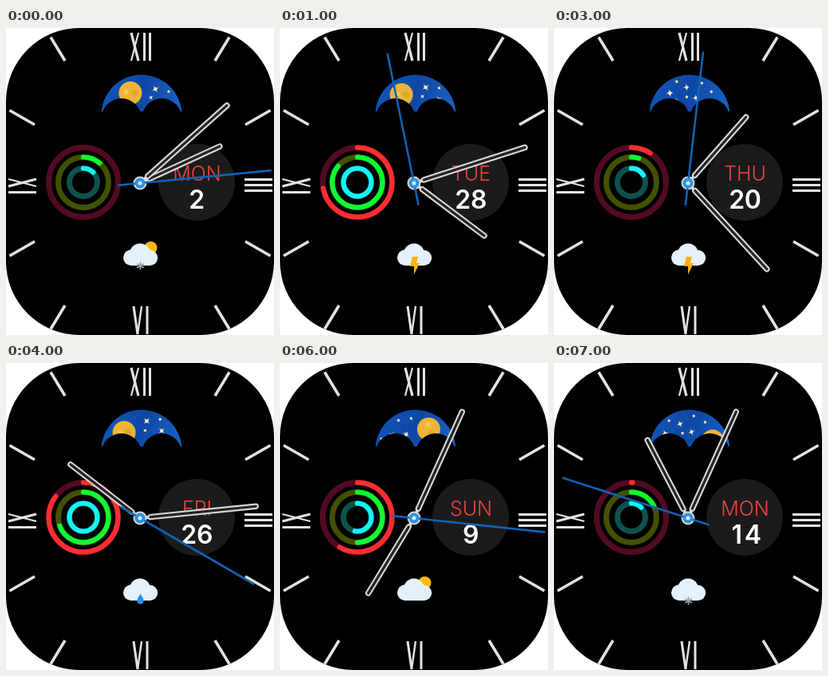
Write an HTML page with a canvas that moves like this. It is 336 px wide and 384 px high and loops after 8000 ms.

```html
<!DOCTYPE html>
<html lang="en">
<head>
<meta charset="utf-8">
<title>Watch face</title>
<style>
  html, body { margin: 0; width: 100%; height: 100%; overflow: hidden; background: #fff; }
  canvas { display: block; width: 336px; height: 384px; }
</style>
</head>
<body>
<canvas id="face" width="336" height="384"></canvas>
<script>
const ctx = document.getElementById('face').getContext('2d');
const RAD = Math.PI / 180, CX = 168, CY = 194;
const INK = '#e4e3e1';

// Angles in degrees clockwise from twelve; rings run from outer to inner.
const looks = [
  { hour: 65.3, minute: 48.3, second: 84.5, day: 'MON', date: 2, moon: -27, rings: [0, 40, 45], sky: 'sun snow' },
  { hour: 126.8, minute: 72.2, second: 348.4, day: 'TUE', date: 28, moon: -35, rings: [260, 310, 360], sky: 'bolt' },
  { hour: 224, minute: 168, second: 163, day: 'WED', date: 11, moon: -70, rings: [240, 200, 270], sky: 'bolt' },
  { hour: 41.4, minute: 137.4, second: 6.6, day: 'THU', date: 20, moon: -97, rings: [33, 17, 59], sky: 'bolt' },
  { hour: 307.6, minute: 84.2, second: 120, day: 'FRI', date: 26, moon: -45, rings: [307, 250, 360], sky: 'drop' },
  { hour: 158, minute: 96, second: 90, day: 'SAT', date: 30, moon: -45, rings: [110, 75, 100], sky: 'drop' },
  { hour: 211.4, minute: 24.4, second: 96.1, day: 'SUN', date: 9, moon: 32, rings: [211, 180, 190], sky: 'sun' },
  { hour: 332.5, minute: 24.4, second: 287.8, day: 'MON', date: 14, moon: 69, rings: [2, 63, 45], sky: 'snow' }
];

// Stars on one half of the moon disc: angle, radius, size.
const stars = [[55, 37, 5.5], [55, 25, 3.5], [76, 45, 1.7], [91, 35, 5], [88, 23, 1.7],
               [117, 23, 5], [118, 43, 1.7], [140, 40, 1.7]];

function dot(x, y, r, color) {
  ctx.fillStyle = color;
  ctx.beginPath();
  ctx.arc(x, y, r, 0, 2 * Math.PI);
  ctx.fill();
}

function line(x1, y1, x2, y2, width, color, cap = 'butt') {
  ctx.strokeStyle = color;
  ctx.lineWidth = width;
  ctx.lineCap = cap;
  ctx.beginPath();
  ctx.moveTo(x1, y1);
  ctx.lineTo(x2, y2);
  ctx.stroke();
}

function at(x, y, degrees, draw) {
  ctx.save();
  ctx.translate(x, y);
  ctx.rotate(degrees * RAD);
  draw();
  ctx.restore();
}

// Condensed numeral, 35 px tall, centred on the origin.
function numeral(text) {
  const widths = { X: 13, V: 13, I: 3 }, gap = 4;
  let x = -([...text].reduce((sum, c) => sum + widths[c] + gap, -gap)) / 2;
  for (const c of text) {
    const w = widths[c];
    if (c === 'I') line(x + 1.5, -17.5, x + 1.5, 17.5, 3, INK);
    if (c === 'X') {
      line(x + 2, -17.5, x + w - 2, 17.5, 3.2, INK);
      line(x + w - 2, -17.5, x + 2, 17.5, 2.2, INK);
    }
    if (c === 'V') {
      line(x + 1.5, -17.5, x + w / 2, 17.5, 3, INK);
      line(x + w - 1.5, -17.5, x + w / 2, 17.5, 2.4, INK);
    }
    x += w + gap;
  }
}

function dial() {
  at(168.5, 23.5, 0, () => numeral('XII'));
  at(316.5, 196.5, 90, () => numeral('III'));
  at(168.5, 365.5, 0, () => numeral('VI'));
  at(20.5, 197, -90, () => numeral('IX'));
  for (const sx of [-1, 1]) for (const sy of [-1, 1]) {
    const mark = (x1, y1, x2, y2) =>
      line(CX + sx * x1, CY + sy * y1, CX + sx * x2, CY + sy * y2, 3.6, INK);
    mark(94, 153, 112, 182.5);
    mark(132, 73, 163.5, 91);
  }
}

function star(x, y, r) {
  if (r < 2) return dot(x, y, r, '#f3dfa4');
  ctx.fillStyle = '#f8ecc8';
  ctx.beginPath();
  ctx.moveTo(x, y - r);
  for (let i = 1; i <= 4; i++) {
    const a = i * 90 * RAD;
    ctx.quadraticCurveTo(x, y, x + r * Math.sin(a), y - r * Math.cos(a));
  }
  ctx.fill();
  dot(x, y, r * 0.3, '#f8ecc8');
}

function moonPhase(angle) {
  ctx.save();
  ctx.beginPath();
  ctx.arc(170, 109, 50.5, 185 * RAD, 355 * RAD);
  ctx.clip();
  const night = ctx.createLinearGradient(120, 60, 220, 100);
  night.addColorStop(0, '#1058bc');
  night.addColorStop(0.5, '#0f47a4');
  night.addColorStop(1, '#1a62c6');
  ctx.fillStyle = night;
  ctx.fillRect(118, 57, 104, 50);
  at(170, 109, angle, () => {
    for (const half of [0, 180]) at(0, 0, half, () => {
      dot(0, -31, 14.5, '#edb536');
      dot(-4, -35, 3, '#f6c952');
      dot(5, -28, 4, '#e2a52c');
      for (const [a, r, size] of stars) star(r * Math.sin(a * RAD), -r * Math.cos(a * RAD), size);
    });
  });
  ctx.restore();
  dot(144.7, 113, 25, '#000');
  dot(195.3, 113, 25, '#000');
}

function activity(rings) {
  const styles = [[43.5, '#530a21', '#ff2d31'], [31.5, '#425200', '#0dff30'], [17.5, '#0e524e', '#12f6f7']];
  styles.forEach(([radius, track, color], i) => {
    const arc = (degrees, width, stroke) => {
      ctx.strokeStyle = stroke;
      ctx.lineWidth = width;
      ctx.lineCap = 'round';
      ctx.beginPath();
      ctx.arc(97, 193, radius, -90 * RAD, (degrees - 90) * RAD);
      ctx.stroke();
    };
    arc(360, 7, track);
    if (rings[i]) arc(rings[i], 6.2, color);
  });
}

function calendar(day, date) {
  dot(239, 193, 48, '#1b1b1c');
  ctx.textAlign = 'center';
  ctx.fillStyle = '#f0423f';
  ctx.font = '300 25px Inter, sans-serif';
  ctx.fillText(day, 239.5, 191);
  ctx.fillStyle = '#fff';
  ctx.font = '600 32px Inter, sans-serif';
  const digits = [...String(date)];
  digits.forEach((digit, i) => ctx.fillText(digit, 239.3 + 20 * (i - (digits.length - 1) / 2), 226));
}

function weather(sky) {
  const cloud = '#e3f1fc';
  if (sky.includes('sun')) dot(181.5, 275, 8, '#ffb90f');
  dot(157, 287.3, 10, cloud);
  dot(168, 282.5, 13, cloud);
  dot(180.5, 287.5, 9.7, cloud);
  ctx.fillRect(157, 283, 23.5, 14.2);
  if (sky.includes('snow')) {
    for (let a = 0; a < 180; a += 60)
      at(168.5, 297.5, a, () => line(0, -5, 0, 5, 1.8, '#90a4ae'));
  }
  if (sky === 'bolt') {
    ctx.fillStyle = '#f9b406';
    ctx.fill(new Path2D('M166 286h7l-2 8h4l-7 14.500v-10.500h-5z'));
  }
  if (sky === 'drop') {
    ctx.fillStyle = '#2491ee';
    ctx.fill(new Path2D('M168.5 289q4 5 4 8.5a4 4 0 0 1-8 0q0-3.500 4-8.500z'));
  }
}

function hand(angle, length) {
  at(CX, CY, angle, () => {
    line(0, 0, 0, -13, 4, INK);
    line(0, -13, 0, -length, 7.4, '#d6d6d6', 'round');
    line(0, -13, 0, -length, 3.2, '#242424', 'round');
  });
}

function secondHand(angle) {
  dot(CX, CY, 8.5, '#d4d6d8');
  at(CX, CY, angle, () => line(0, 28, 0, -165.5, 2.6, '#0f62b5'));
  dot(CX, CY, 6.5, '#2f93e0');
  dot(CX, CY, 2.5, '#e4eef6');
}

function render() {
  const look = looks[Math.floor(performance.now() / 1000) % looks.length];
  ctx.fillStyle = '#fff';
  ctx.fillRect(0, 0, 336, 384);
  ctx.save();
  ctx.beginPath();
  ctx.roundRect(0, 0, 336, 384, 92);
  ctx.clip();
  ctx.fillStyle = '#000';
  ctx.fillRect(0, 0, 336, 384);
  dial();
  moonPhase(look.moon);
  activity(look.rings);
  calendar(look.day, look.date);
  weather(look.sky);
  hand(look.hour, 110);
  hand(look.minute, 146);
  secondHand(look.second);
  ctx.restore();
  requestAnimationFrame(render);
}
render();
</script>
</body>
</html>
```
